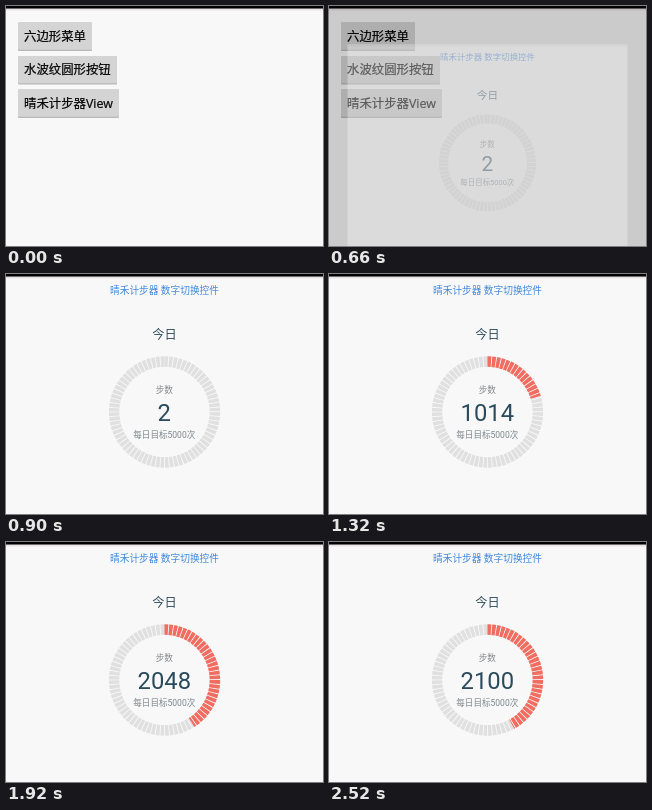
Recreate the animation shown at these times as an HTML page. Size 317 by 240 pixels, loop 2.76 s.

```html
<!DOCTYPE html>
<html lang="zh">
<head>
<meta charset="utf-8">
<style>
html, body { margin: 0; width: 100%; height: 100%; overflow: hidden; background: #f8f8f8; }
svg { display: block; width: 100vw; height: 100vh; }
text { font-family: Roboto, "Noto Sans CJK SC", "Noto Sans CJK", sans-serif; }
.btn text {
  font: 12.4px "Open Sans", "Noto Sans CJK SC", "Noto Sans CJK", sans-serif;
  fill: #000; stroke: #000; stroke-width: .2px;
}
.mid { text-anchor: middle; }
</style>
</head>
<body>
<svg viewBox="0 0 317 240">
  <defs>
    <linearGradient id="shade" x1="0" y1="0" x2="0" y2="1">
      <stop offset="0" stop-color="#dcd4d9"/>
      <stop offset="1" stop-color="#f8f8f8"/>
    </linearGradient>
  </defs>
  <g id="menu">
    <rect width="317" height="240" fill="#f8f8f8"/>
    <rect y="2" width="317" height="3.5" fill="url(#shade)"/>
  </g>
  <rect id="dim" width="317" height="240"/>
  <g id="page">
    <rect x="-2" y="2" width="321" height="600" fill="#f8f8f8"/>
    <rect x="-2" y="2" width="321" height="3.5" fill="url(#shade)"/>
    <g class="mid">
      <text x="158.5" y="20.3" font-size="9.7" fill="#3f88dc">晴禾计步器 数字切换控件</text>
      <text x="158.5" y="64.8" font-size="12.2" fill="#2f4c5c">今日</text>
      <text x="158.3" y="119.4" font-size="8.6" fill="#86898b">步数</text>
      <text id="count" x="158.3" y="147.2" font-size="23.8" fill="#2b4b5d"></text>
      <text x="158.3" y="163.6" font-size="8.55" fill="#7b868c">每日目标5000次</text>
    </g>
    <g id="ring" fill="none" stroke-width="10.5">
      <path id="track" stroke="#e0e0e0"/>
      <path id="bar" stroke="#f26c60"/>
    </g>
  </g>
  <rect width="317" height="2.5"/>
  <path id="cursor" d="M0 0V16.4L3.8 12.8L6.5 19.3L9.3 18.1L6.6 11.8H12Z" fill="#fff" stroke="#111" stroke-width="1" stroke-linejoin="round"/>
</svg>
<script>
const LOOP = 2760, STEP = 60, GOAL = 5000, TOTAL = 2100;
const CX = 158.5, CY = 138, R = 50.4, TICKS = 72;
const $ = id => document.getElementById(id);
const clamp = v => Math.max(0, Math.min(1, v));
const span = (t, from, to) => clamp((t - from) / (to - from));
const easeOut = p => 1 - (1 - p) ** 2;
const easeBoth = p => 0.5 - 0.5 * Math.cos(Math.PI * p);

function addButton(label, y, width) {
  $('menu').insertAdjacentHTML('beforeend', `<g class="btn" transform="translate(12 ${y})">
    <rect width="${width}" height="28.5" rx="1" fill="#b8b8b8"/>
    <rect width="${width}" height="27.3" rx="1" fill="#d4d4d4"/>
    <text x="6" y="18.4">${label}</text></g>`);
}
addButton('六边形菜单', 16.5, 74);
addButton('水波纹圆形按钮', 50, 99);
addButton('晴禾计步器View', 83.5, 101);

// Clockwise arc from the top, in two pieces
function arc(turn) {
  const at = k => {
    const a = 2 * Math.PI * k;
    return `${CX + R * Math.sin(a)} ${CY - R * Math.cos(a)}`;
  };
  const half = `A${R} ${R} 0 0 1 `;
  return `M${at(0)}${half}${at(turn / 2)}${half}${at(turn)}`;
}
const pitch = 2 * Math.PI * R / TICKS;
$('ring').setAttribute('stroke-dasharray', `${pitch * 0.8} ${pitch * 0.2}`);
$('track').setAttribute('d', arc(1));

function steps(t) {
  if (t < 960) return 2;
  return Math.round(TOTAL * easeBoth(span(t, 604.82, 2067.1)));
}

function cubic(p, a, b, c, d) {
  const q = 1 - p;
  return q ** 3 * a + 3 * q * q * p * b + 3 * q * p * p * c + p ** 3 * d;
}

function cursorAt(t) {
  if (t >= 60 && t < 600) {
    const p = easeOut(span(t, 60, 480));
    return [cubic(p, 290, 126, 128, 71.5), cubic(p, 32.5, 32.5, 32.5, 97.5)];
  }
  if (t >= 2280 && t < 2520) {
    const p = span(t, 2280, 2460);
    return [287 + 28 * p, 17 - 15 * p];
  }
  return null;
}

function draw(t) {
  const open = easeOut(span(t, 600, 900));
  const scale = 0.8 + 0.2 * open;
  $('dim').setAttribute('opacity', 0.5 * open);
  $('page').setAttribute('opacity', open);
  $('page').setAttribute('transform',
    `translate(${CX} 285) scale(${scale}) translate(${-CX} -285)`);

  const n = steps(t);
  $('count').textContent = n;
  $('bar').setAttribute('d', n > 2 ? arc(n / GOAL) : '');

  const tip = cursorAt(t);
  $('cursor').setAttribute('visibility', tip ? 'visible' : 'hidden');
  if (tip) $('cursor').setAttribute('transform', `translate(${tip})`);
}

const start = performance.now();
function tick() {
  const t = (performance.now() - start) % LOOP;
  draw(Math.floor(t / STEP) * STEP);
  requestAnimationFrame(tick);
}
tick();
</script>
</body>
</html>
```
